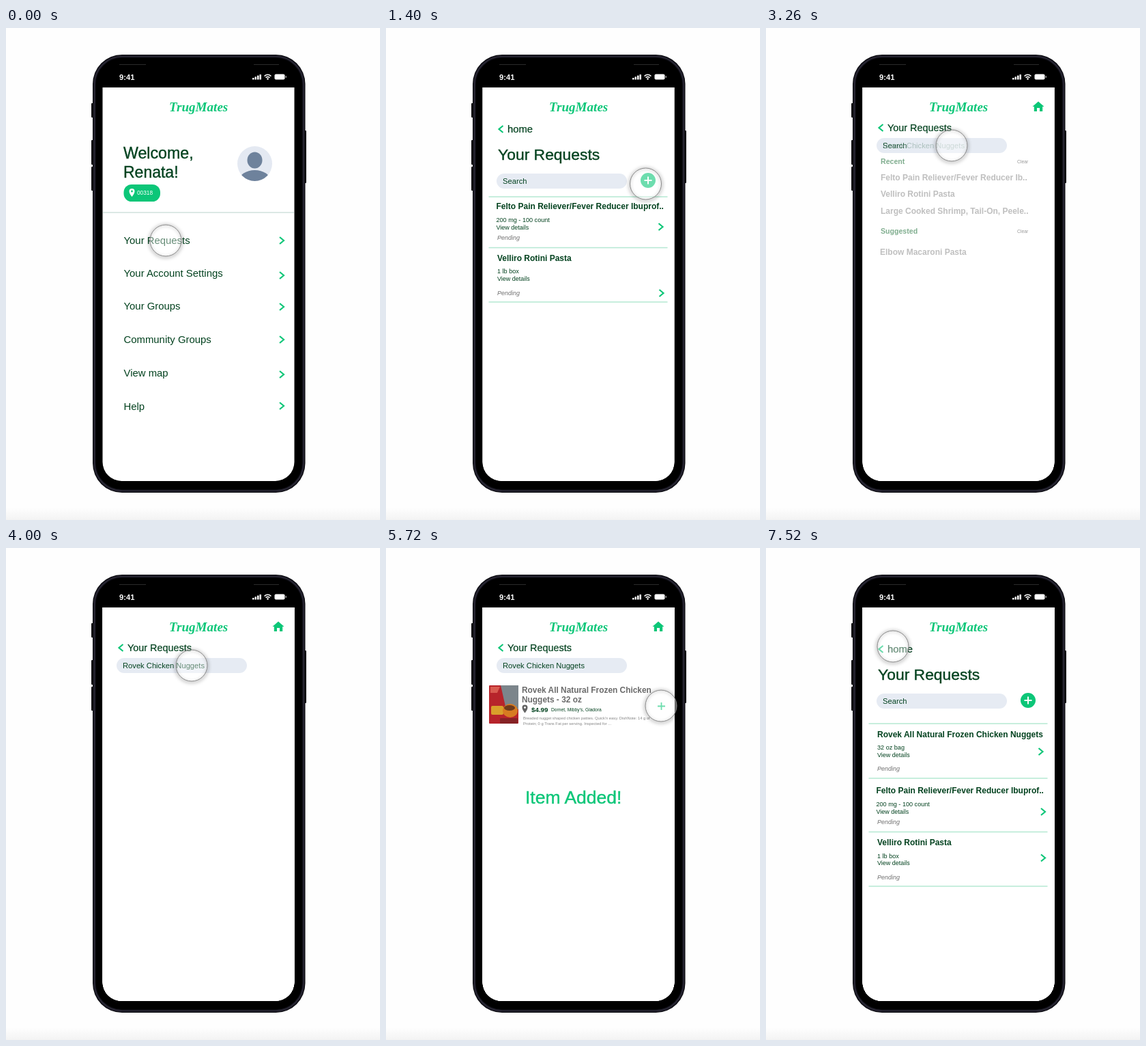
Recreate the animation shown at these times as an HTML page. Size 548 px wide and 720 px high, loop 7540 ms.

```html
<!DOCTYPE html>
<html lang="en">
<head>
<meta charset="utf-8">
<title>Grocery app prototype</title>
<style>
html, body { margin: 0; width: 100%; height: 100%; overflow: hidden; background: #fefefe; }
svg { display: block; width: 548px; height: 720px; font-family: "Liberation Sans", Arial, sans-serif; }
text { white-space: pre; }
</style>
</head>
<body>
<svg id="stage" viewBox="0 0 548 720"></svg>
<script>
const LOOP = 7540, FADE = 240;
const DARK = '#03421f', GREEN = '#0cc678', LINE = '#b5e8d2', GREY = '#a9a9a9';

// Drawing helpers
const text = (x, y, size, str, fill = DARK, extra = '') =>
  `<text x="${x}" y="${y}" font-size="${size}" fill="${fill}" ${extra}>${str}</text>`;
const bold = (x, y, size, str, fill = DARK) => text(x, y, size, str, fill, 'font-weight="700"');
const medium = (x, y, size, str, fill = DARK) =>
  text(x, y, size, str, fill, `stroke="${fill}" stroke-width="${size / 60}"`);
const rect = (x, y, w, h, r, fill, extra = '') =>
  `<rect x="${x}" y="${y}" width="${w}" height="${h}" rx="${r}" fill="${fill}" ${extra}/>`;
const path = (d, fill, extra = '') => `<path d="${d}" fill="${fill}" ${extra}/>`;
const stroke = (d, color, width) => path(d, 'none', `stroke="${color}" stroke-width="${width}"`);
const circle = (x, y, r, fill) => `<circle cx="${x}" cy="${y}" r="${r}" fill="${fill}"/>`;
const chevron = (x, y, dir = 1) =>
  stroke(`M${x - 3 * dir} ${y - 5}l${6 * dir} 5l${-6 * dir} 5`, GREEN, 2.2);
const plus = (x, y, r, color, width) =>
  stroke(`M${x - r} ${y}h${2 * r}M${x} ${y - r}v${2 * r}`, color, width);
const pin = (x, y, fill, hole) =>
  path(`M${x} ${y + 6}c-2-3-4-5-4-8a4 4 0 0 1 8 0c0 3-2 5-4 8z`, fill) + circle(x, y - 2, 1.4, hole);
const divider = y => stroke(`M150.500 ${y}H412.500`, LINE, 1.4);
const searchBar = (y, str) => rect(162, y, 191, 22, 11, '#e6ebf3') + text(171, y + 15, 11.2, str);

const request = (x, ys, name, size, chevX, chevY) =>
  bold(x, ys[0], 12, name) + text(x, ys[1], 9.1, size) + text(x, ys[2], 9, 'View details') +
  text(163, ys[3], 9, 'Pending', '#727272', 'font-style="italic"') +
  chevron(chevX, chevY) + divider(ys[4]);

const pills = 'Felto Pain Reliever/Fever Reducer Ib';
const pasta = 'Velliro Rotini Pasta';
const nuggets = 'Rovek All Natural Frozen Chicken';

const requestsHead = top => chevron(168.5, 148, -1) + medium(178, 153, 14.8, 'home') +
  medium(164, 193, 22.9, 'Your Requests') + searchBar(213, 'Search') +
  circle(384, 223, 11, GREEN) + plus(384, 223, 5.5, '#fff', 2) + divider(top);

const searchHead = str => chevron(168.5, 146, -1) + medium(178, 151, 14.4, 'Your Requests') +
  path('M399 107.500l8.500 7.500h-2.300v7h-4.200v-5h-4v5h-4.200v-7h-2.300z', GREEN) + searchBar(161, str);

const product =
  rect(151, 201, 43, 56, 1, '#b7242b') +
  path('M168 201H194V236H176z', '#7c858b') +
  path('M153 203h14l-4 9h-10z', '#d85b50') +
  rect(154, 231, 18, 13, 2, '#d9a02b') +
  `<ellipse cx="182" cy="238" rx="11" ry="10" fill="#d77b21"/>` +
  `<ellipse cx="181" cy="234" rx="8" ry="4" fill="#6f3b1c"/>` +
  rect(167, 249, 26, 8, 1, '#862225');

const pages = [
  // Home
  medium(172, 191, 23.2, 'Welcome,') + medium(172, 219, 23, 'Renata!') +
  rect(172.5, 229, 53.5, 25, 11.5, GREEN) + pin(184.5, 241, '#fff', GREEN) +
  text(192, 244, 8.3, '00318', '#fff') +
  circle(364.5, 198.5, 25.5, '#e4e9f2') +
  `<g clip-path="url(#face)"><ellipse cx="364.500" cy="193.500" rx="11" ry="12" fill="#6e829c"/>` +
  `<ellipse cx="364.500" cy="223" rx="23" ry="15" fill="#6e829c"/></g>` +
  stroke('M142 270H422', '#cfe0dc', 1.5) +
  [['Your Requests', 316, 311], ['Your Account Settings', 364, 362], ['Your Groups', 412, 408],
   ['Community Groups', 461, 456], ['View map', 510, 507], ['Help', 558.5, 553]]
    .map(([str, y, cy]) => text(172.5, y, 14.9, str) + chevron(404, cy)).join(''),

  // Two requests
  requestsHead(247) +
  request(161.5, [265, 284, 295, 310, 321.5], pills + 'uprof..', '200 mg - 100 count', 402.5, 291) +
  request(163, [341, 359, 370, 390.5, 401], pasta, '1 lb box', 403.5, 388),

  // Search suggestions
  searchHead('Search') + bold(168, 199, 10.6, 'Recent', '#559269') + text(368, 197.5, 6.8, 'Clear', '#777') +
  bold(168, 222.5, 12, pills + '..', GREY) + bold(168, 247, 12, pasta, GREY) +
  bold(168, 271.5, 12, 'Large Cooked Shrimp, Tail-On, Peele..', GREY) +
  bold(168, 301, 10.6, 'Suggested', '#559269') + text(368, 299.5, 6.8, 'Clear', '#777') +
  bold(167, 331.5, 12, 'Elbow Macaroni Pasta', GREY),

  // Query entered
  searchHead('Rovek Chicken Nuggets'),

  // Search result
  searchHead('Rovek Chicken Nuggets') + product +
  bold(199, 212, 11.9, nuggets, '#6b6b6b') + bold(199, 226, 11.9, 'Nuggets - 32 oz', '#6b6b6b') +
  pin(203.5, 235.500, '#626262', '#fff') + bold(213, 239.5, 9.8, '$4.99') +
  text(242, 238.5, 6.7, "Dornet, Mibby's, Gladora") +
  text(201, 251, 5.8, "Breaded nugget shaped chicken patties. Quick'n easy. DishNote: 14 g of", '#858585') +
  text(201, 258.5, 5.8, 'Protein; 0 g Trans Fat per serving. Inspected for ...', '#858585') +
  plus(403.5, 231.5, 5.5, GREEN, 1.8),

  // Three requests
  requestsHead(257) +
  request(163, [276.5, 295, 305.5, 326, 337], nuggets + ' Nuggets', '32 oz bag', 402.5, 298) +
  request(161.5, [359, 378, 388.5, 404, 415.5], pills + 'uprof..', '200 mg - 100 count', 406, 386) +
  request(163, [435, 453.5, 464, 484.5, 495], pasta, '1 lb box', 406, 453.5)
];
const starts = [0, 450, 1750, 3200, 4450, 6750];

const phone =
  rect(125, 110, 4, 21, 1, '#0b0b10') + rect(125, 164, 4, 36, 1, '#0b0b10') +
  rect(125, 203, 4, 35, 1, '#0b0b10') + rect(436, 150, 4, 77, 1, '#0b0b10') +
  rect(127, 39, 311.5, 641, 43, '#08080d') +
  rect(129.5, 41.5, 306.5, 636, 41, 'none', 'stroke="#262431" stroke-width="2.500"') +
  rect(132, 44, 301.5, 631, 38, '#000') +
  stroke('M166 53.500H205M363 53.500H400', '#2b2b2b', 1);

const status = bold(166, 76, 11.2, '9:41', '#fff') +
  [0, 1, 2, 3].map(i => rect(361 + i * 3.5, 73 - i * 1.7, 2.5, 2.5 + i * 1.7, .6, '#fff')).join('') +
  stroke('M378.500 70.500q5-4.500 10 0M380.500 72.700q3-2.700 6 0', '#fff', 1.6) +
  circle(383.5, 74.5, 1.3, '#fff') +
  rect(393.5, 67.5, 15, 8, 2, '#fff') + rect(409.5, 70, 1.5, 3, .7, '#aaa');

document.getElementById('stage').innerHTML = `
<defs>
  <linearGradient id="floor" x2="0" y2="1"><stop stop-color="#fefefe"/><stop offset="1" stop-color="#f3f3f3"/></linearGradient>
  <clipPath id="screen"><path d="M141.500 87H422.500V635a28 28 0 0 1-28 28H169.500a28 28 0 0 1-28-28z"/></clipPath>
  <clipPath id="face"><circle cx="364.500" cy="198.500" r="25.500"/></clipPath>
  <filter id="soft" x="-50%" y="-50%" width="200%" height="200%"><feGaussianBlur stdDeviation="2.500"/></filter>
</defs>
${rect(0, 0, 548, 720, 0, '#fefefe')}${rect(0, 702, 548, 18, 0, 'url(#floor)')}
${phone}${status}
<g clip-path="url(#screen)">
  ${pages.map(p => `<g class="page">${rect(141, 87, 282, 577, 0, '#fff')}${p}</g>`).join('')}
  ${text(239, 121.5, 19.1, 'TrugMates', GREEN,
    'font-family="Liberation Serif, Times, serif" font-style="italic" font-weight="700"')}
  <g id="added">${medium(204, 374, 26.5, 'Item Added!', GREEN)}</g>
</g>
<g id="cursor">
  <circle cy="1" r="23.500" fill="none" stroke="#000" stroke-opacity=".28" stroke-width="3" filter="url(#soft)"/>
  <circle r="23" fill="#fff" fill-opacity=".4" stroke="#8a8a8a" stroke-width="1"/>
</g>`;

const layers = [...document.querySelectorAll('.page')];
const added = document.getElementById('added');
const cursor = document.getElementById('cursor');

// time, x, y, opacity
const moves = [
  [0, 234, 311, 1], [500, 234, 311, 1], [1300, 380.5, 228, 1], [2210, 380.5, 228, 1],
  [3090, 272, 172, 1], [4300, 272, 172, 1], [4800, 272, 231, .55], [4950, 272, 231, .55],
  [5400, 403, 231, 1], [5900, 403, 231, 1], [6620, 168, 154, 1], [6850, 168, 154, 1],
  [7300, 186, 144, 1], [LOOP, 186, 144, 1]
];
const ramp = (t, a, b) => Math.min(1, Math.max(0, (t - a) / (b - a)));
const ease = u => u * u * (3 - 2 * u);

function draw(t) {
  layers.forEach((g, i) => {
    g.setAttribute('opacity', i ? ramp(t, starts[i], starts[i] + FADE) : 1);
  });
  added.setAttribute('opacity', ramp(t, 5500, 5700) * (1 - ramp(t, 6150, 6432)));
  const i = moves.findIndex(m => m[0] > t), a = moves[i - 1], b = moves[i];
  const u = ease(ramp(t, a[0], b[0]));
  const [, x, y, alpha] = a.map((v, k) => v + (b[k] - v) * u);
  cursor.setAttribute('transform', `translate(${x} ${y})`);
  cursor.setAttribute('opacity', alpha);
}

const begin = performance.now();
function tick() {
  draw((performance.now() - begin) % LOOP);
  requestAnimationFrame(tick);
}
tick();
</script>
</body>
</html>
```
